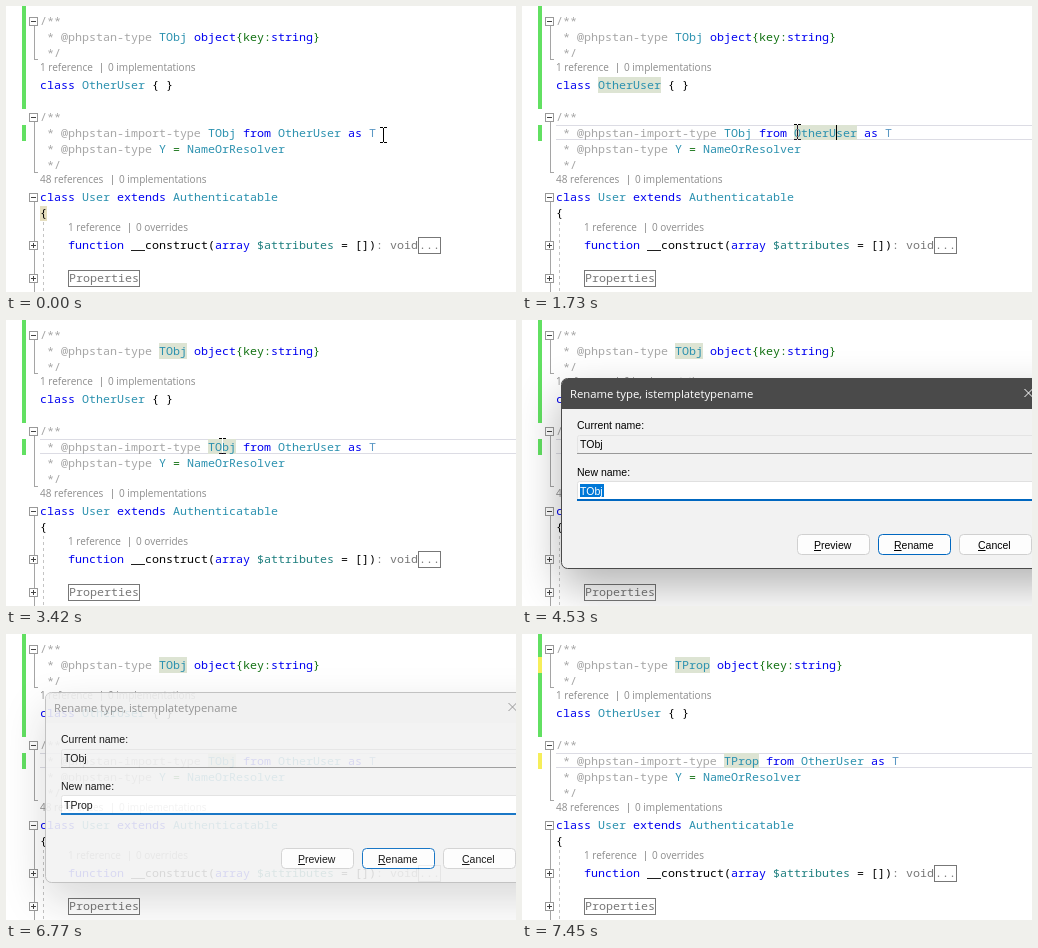
Recreate the animation shown at these times as an HTML page with a canvas. Size 510 by 286 pixels, loop 8 s.

```html
<!DOCTYPE html>
<html lang="en">
<head>
<meta charset="utf-8">
<title>Rename type</title>
<style>
html, body { margin: 0; width: 100%; height: 100%; overflow: hidden; background: #fff; }
canvas { display: block; }
</style>
</head>
<body>
<canvas id="stage" width="510" height="286"></canvas>
<script>
const ctx = document.getElementById('stage').getContext('2d');
const LOOP = 8000, CHAR = 7;
const MONO = `${CHAR / 0.6}px "Noto Sans Mono", monospace`;
const LENS = '10px "Open Sans", sans-serif';
const TITLE = '11.3px "Open Sans", sans-serif';
const LABEL = '10.5px "Liberation Sans", Arial, sans-serif';
const GRAY = '#a6a6a6', BLUE = '#0000f0', TEAL = '#2b91af', GREEN = '#107010',
      BLACK = '#000', DIM = '#777', ACCENT = '#0067c0', MARK = '#dde4d3';

const between = (t, a, b) => t >= a && t < b;

function rect(x, y, w, h, color) {
  ctx.fillStyle = color;
  ctx.fillRect(x, y, w, h);
}

function frame(x, y, w, h, color) {
  ctx.strokeStyle = color;
  ctx.lineWidth = 1;
  ctx.strokeRect(x + 0.5, y + 0.5, w - 1, h - 1);
}

function text(x, y, str, color, font) {
  ctx.font = font;
  ctx.fillStyle = color;
  ctx.fillText(str, x, y);
}

// Draws pairs of colour and string on the character grid; y is the row centre.
function code(x, y, ...parts) {
  for (let i = 0; i < parts.length; i += 2) {
    text(x, y + 4, parts[i + 1], parts[i], MONO);
    x += parts[i + 1].length * CHAR;
  }
}

function lens(x, y, refs, barX, rest) {
  text(x, y + 3, refs, '#8c8c8c', LENS);
  rect(barX, y - 5, 1, 10, '#a0a0a0');
  text(barX + 7, y + 3, rest, '#8c8c8c', LENS);
}

function fold(y, open) {
  rect(23, y - 4, 9, 9, '#fff');
  frame(23, y - 4, 9, 9, '#999');
  rect(25, y, 5, 1, '#444');
  if (!open) rect(27, y - 2, 1, 5, '#444');
}

function foldRange(top, bottom) {
  rect(28, top, 1, bottom - top, '#a5a5a5');
  if (bottom < 286) rect(28, bottom - 1, 4, 1, '#a5a5a5');
  fold(top, true);
}

function editor(t) {
  const renamed = t >= 6900;
  const name = renamed ? 'TProp' : 'TObj';
  const nameMarked = between(t, 2430, 6900) || t >= 7300;
  const typeColor = between(t, 6900, 7270) ? GRAY : TEAL;
  const bar = renamed ? '#f6ee5a' : '#62e062';

  rect(0, 0, 510, 286, '#fff');
  rect(16, 0, 4, 103, '#62e062');
  rect(16, 23, 4, 16, bar);
  rect(16, 119, 4, 16, bar);
  foldRange(15, 54);
  foldRange(111, 167);
  foldRange(191, 286);
  fold(239);
  fold(272);
  for (let y = 216; y < 286; y += 6) rect(37, y, 1, 3, '#c4c4c4');

  if (t >= 110) {
    rect(34, 119, 476, 1, '#dcdce4');
    rect(34, 133, 476, 1, '#dcdce4');
  }
  if (t < 200) {
    rect(34, 200, 7, 15, '#e6dfbf');
  }
  if (between(t, 1250, 2430)) {
    rect(76, 71, 63, 16, MARK);
    rect(272, 119, 63, 15, MARK);
  }
  if (nameMarked) {
    rect(153, 23, name.length * CHAR, 16, MARK);
    rect(202, 119, name.length * CHAR, 15, MARK);
  }

  code(34, 15, GRAY, '/**');
  code(34, 31, GRAY, ' * @phpstan-type ', typeColor, name, BLUE, ' object',
    GREEN, '{key:', BLUE, 'string', GREEN, '}');
  code(34, 47, GRAY, ' */');
  lens(34, 62, '1 reference', 95, '0 implementations');
  code(34, 79, BLUE, 'class ', TEAL, 'OtherUser', BLACK, ' { }');
  code(34, 111, GRAY, '/**');
  code(34, 127, GRAY, ' * @phpstan-import-type ', typeColor, name, BLUE, ' from ',
    typeColor, 'OtherUser', BLUE, ' as ', '#5b98c4', 'T');
  code(34, 143, GRAY, ' * @phpstan-type ', TEAL, 'Y', GREEN, ' = ', TEAL, 'NameOrResolver');
  code(34, 159, GRAY, ' */');
  lens(34, 174, '48 references', 106, '0 implementations');
  code(34, 191, BLUE, 'class ', TEAL, 'User', BLUE, ' extends ', TEAL, 'Authenticatable');
  code(34, 207, BLACK, '{');
  lens(62, 222, '1 reference', 123, '0 overrides');
  code(62, 239, BLUE, 'function ', BLACK, '__construct(', BLUE, 'array ',
    '#1f7f7f', '$attributes', BLACK, ' = [])', DIM, ': void');
  frame(412, 231, 23, 17, DIM);
  code(413, 239, DIM, '...');
  frame(62, 264, 72, 17, DIM);
  code(63, 272, DIM, 'Properties');
}

function caretX(t) {
  if (between(t, 110, 640)) return 370;
  if (between(t, 1190, 2430)) return 314;
  if (between(t, 2430, 3040) || between(t, 3420, 3980) || between(t, 6960, 7450)) return 216;
  return null;
}

function mouseAt(t) {
  const ease = (a, b) => 1 - (1 - Math.min(1, Math.max(0, (t - a) / (b - a)))) ** 1.8;
  const first = ease(450, 810), second = ease(1550, 2230);
  return [Math.round(377 - 58 * first - 103 * second), Math.round(121 - 3 * first)];
}

// The pointer inverts whatever lies below it, including the caret.
function pointer(t) {
  const [x, y] = mouseAt(t);
  ctx.globalCompositeOperation = 'difference';
  for (const row of [y, y + 15]) {
    rect(x - 3, row, 3, 1, '#fff');
    rect(x + 1, row, 3, 1, '#fff');
  }
  rect(x, y + 1, 1, 14, '#fff');
  ctx.globalCompositeOperation = 'source-over';
}

function panel(x, y, w, h, r, fill, stroke) {
  ctx.beginPath();
  ctx.roundRect(x + 0.5, y + 0.5, w - 1, h - 1, r);
  ctx.fillStyle = fill;
  ctx.fill();
  ctx.shadowColor = 'transparent';
  ctx.strokeStyle = stroke;
  ctx.lineWidth = 1;
  ctx.stroke();
}

function button(x, label, labelX, border) {
  panel(x, 214, 73, 21, 4, '#fdfdfd', border);
  text(labelX, 229, label, BLACK, LABEL);
  rect(labelX, 230, ctx.measureText(label[0]).width, 1, BLACK);
}

function dialog(t) {
  const active = t < 6770;
  const typed = Math.min(5, Math.floor((t - 5480) / 62.5) + 1);

  ctx.save();
  ctx.shadowColor = `rgba(0,0,0,${active ? 0.3 : 0.17})`;
  ctx.shadowBlur = 44;
  ctx.shadowOffsetY = 18;
  panel(39, 58, 520, 191, 6, '#f2f2f2', active ? '#4a4a4a' : '#bbb');
  ctx.restore();
  ctx.beginPath();
  ctx.roundRect(40, 59, 518, 30, [5, 5, 0, 0]);
  ctx.fillStyle = active ? '#4a4a4a' : '#f0f0f0';
  ctx.fill();

  const titleColor = active ? '#fff' : '#8a8a8a';
  text(48, 78, 'Rename type, istemplatetypename', titleColor, TITLE);
  ctx.beginPath();
  ctx.moveTo(502.5, 69);
  ctx.lineTo(510.5, 77);
  ctx.moveTo(510.5, 69);
  ctx.lineTo(502.5, 77);
  ctx.strokeStyle = titleColor;
  ctx.stroke();

  text(55, 109, 'Current name:', BLACK, LABEL);
  panel(55, 115, 500, 19, 2, '#f2f2f2', '#e4e4e4');
  rect(55, 133, 455, 1, '#999');
  text(58, 128, 'TObj', BLACK, LABEL);

  text(55, 156, 'New name:', BLACK, LABEL);
  panel(55, 161, 500, 20, 2, '#fff', '#e0e0e0');
  rect(55, 179, 455, 2, ACCENT);
  if (typed < 1) {
    rect(58, 164, 24, 13, '#0078d7');
    text(58, 175, 'TObj', '#fff', LABEL);
  } else {
    const value = 'TProp'.slice(0, typed);
    text(58, 175, value, BLACK, LABEL);
    if (t < 6230) rect(59 + Math.round(ctx.measureText(value).width), 164, 1, 13, BLACK);
  }

  button(275, 'Preview', 292, '#d0d0d0');
  button(356, 'Rename', 372, ACCENT);
  button(437, 'Cancel', 456, '#d0d0d0');
}

function dialogAlpha(t) {
  if (t < 4480 || t >= 6960) return 0;
  if (t < 4530) return 0.6;
  if (t < 6770) return 1;
  return t < 6830 ? 0.9 : t < 6900 ? 0.5 : 0.2;
}

// The dialog fades as one layer, so it is blended over a finished editor.
const layer = new OffscreenCanvas(510, 286);

function render(t) {
  editor(t);
  const caret = caretX(t);
  if (caret !== null) rect(caret, 119, 1, 15, BLACK);
  if (t < 4480) pointer(t);

  const alpha = dialogAlpha(t);
  if (!alpha) return;
  if (alpha === 1) {
    dialog(t);
    return;
  }
  layer.getContext('2d').drawImage(ctx.canvas, 0, 0);
  dialog(t);
  ctx.globalAlpha = 1 - alpha;
  ctx.drawImage(layer, 0, 0);
  ctx.globalAlpha = 1;
}

function tick(now) {
  render(now % LOOP);
  requestAnimationFrame(tick);
}
requestAnimationFrame(tick);
</script>
</body>
</html>
```
